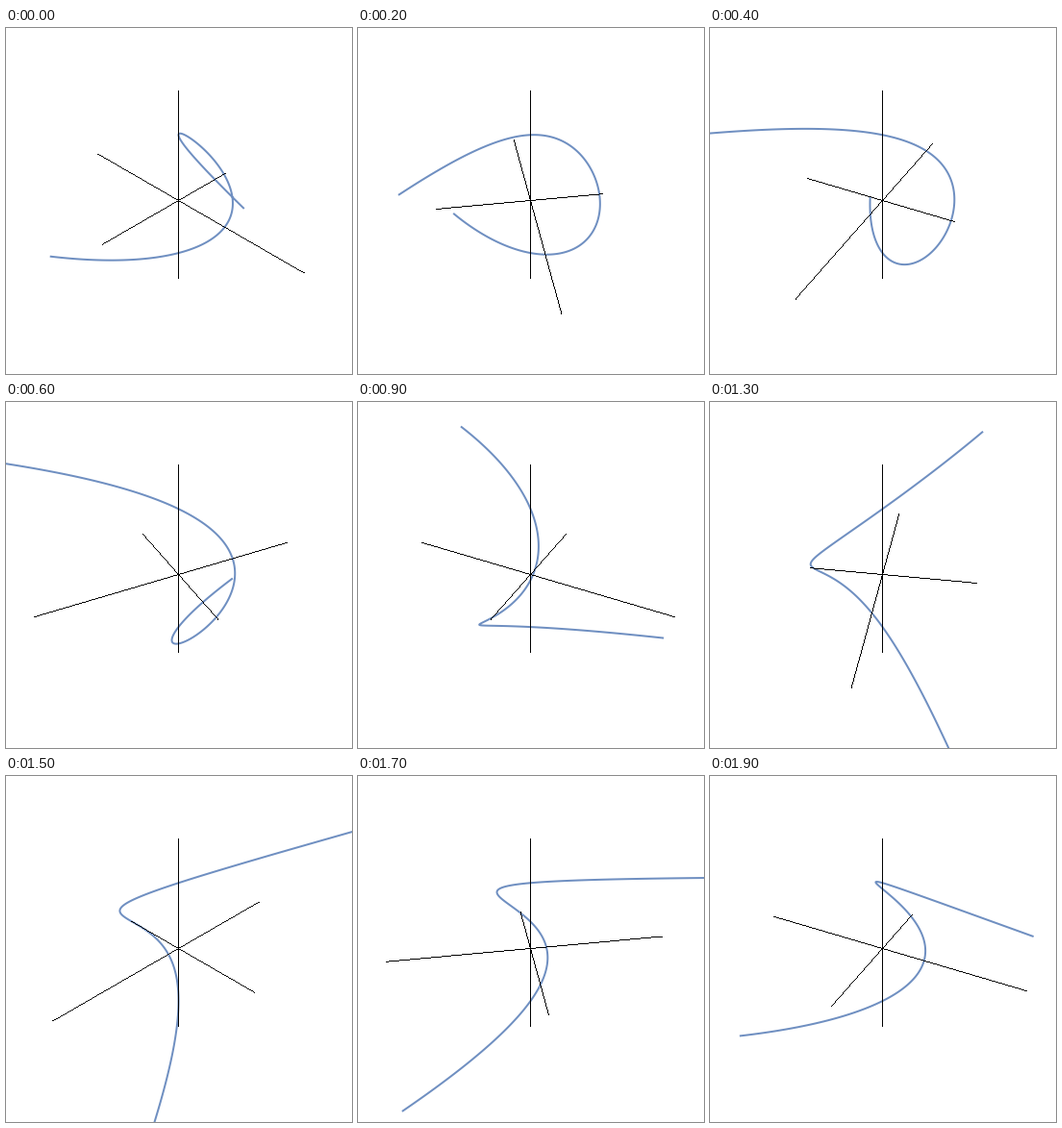
Recreate the animation shown at these times as a matplotlib script. Size 360 px wide and 360 px high, loop 2000 ms.

```python
import numpy as np
import matplotlib.pyplot as plt
from matplotlib.animation import FuncAnimation

plt.rcParams["path.simplify"] = False

SIZE, DPI = 360, 72          # 72 dpi: one point is one pixel
FRAMES, INTERVAL = 20, 100
CENTER = 179.5
FOCAL = 386
DIST = 3 * np.sqrt(3)        # camera at (3, 3, 3)
SIN, COS = 1 / np.sqrt(3), np.sqrt(2 / 3)

# A nodal cubic lifted along z, so its double point splits at z = -1 and z = 1
t = np.linspace(-1.5, 1.5, 400)
cubic = np.array([t**2 - 1, t**3 - t, t])


def padded_axis(i):
    """Axis through the origin, 2 % longer than the curve's range at each end."""
    low, high = cubic[i].min(), cubic[i].max()
    pad = 0.02 * (high - low)
    ends = np.zeros((3, 2))
    ends[i] = low - pad, high + pad
    return ends


def project(points, turn):
    """Turn about z, then apply perspective from the raised camera."""
    x, y, z = points
    a = np.radians(135) + turn
    right = x * np.cos(a) + y * np.sin(a)
    near = x * np.sin(a) - y * np.cos(a)
    scale = FOCAL / (DIST - near * COS - z * SIN)
    return CENTER + right * scale, CENTER - (z * COS - near * SIN) * scale


def crisp(xs, ys):
    """Hard-edged hairline: one pixel-long dash per step of the longer side."""
    steep = abs(np.diff(ys)) > abs(np.diff(xs))
    major, minor = (ys, xs) if steep else (xs, ys)
    order = np.argsort(major)
    major, minor = major[order], minor[order]
    m = np.arange(np.floor(major[0]), np.floor(major[1]) + 1)
    n = np.floor(np.interp(m + 0.5, major, minor))
    col, row = (n, m) if steep else (m, n)
    gap = np.full_like(col, np.nan)
    return (np.column_stack([col, col + 1, gap]).ravel(),
            np.column_stack([row + 0.5, row + 0.5, gap]).ravel())


fig = plt.figure(figsize=(SIZE / DPI, SIZE / DPI), dpi=DPI, facecolor="white")
ax = fig.add_axes([0, 0, 1, 1])
ax.set(xlim=(0, SIZE), ylim=(SIZE, 0))
ax.axis("off")

axes3d = [padded_axis(i) for i in range(3)]
curve, = ax.plot([], [], color="#6f8fc1", lw=2, solid_capstyle="projecting")
rods = [ax.plot([], [], color="black", lw=1, snap=False,
                solid_capstyle="butt")[0] for _ in axes3d]


def draw(frame):
    turn = 2 * np.pi * frame / FRAMES
    curve.set_data(*project(cubic, turn))
    for rod, ends in zip(rods, axes3d):
        rod.set_data(*crisp(*project(ends, turn)))
    return [curve, *rods]


anim = FuncAnimation(fig, draw, frames=FRAMES, interval=INTERVAL,
                     init_func=lambda: draw(0), repeat=True, repeat_delay=0)
plt.show()
```
